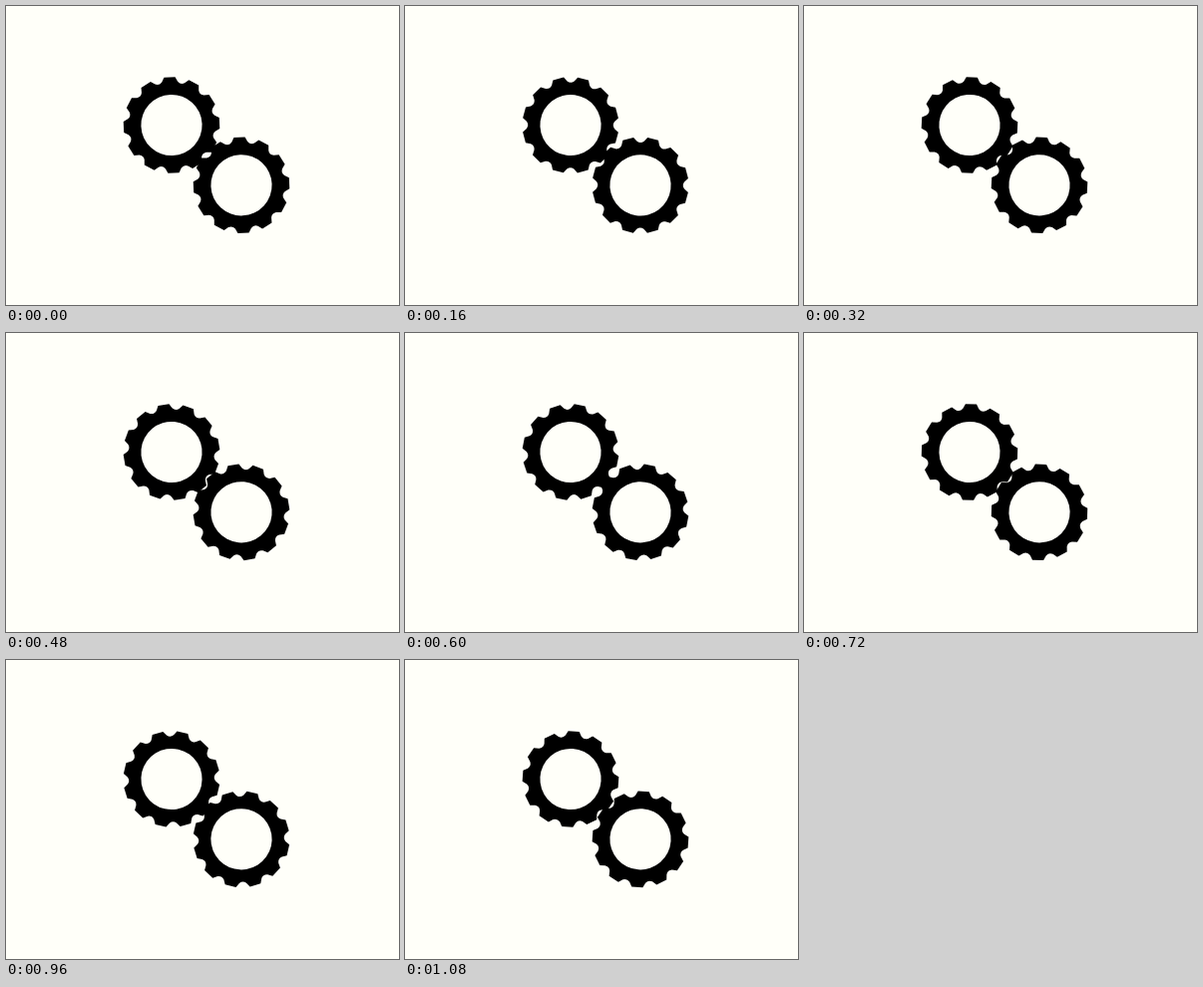
These frames come from a looping animation (394x300 px, 1.12 s). An HTML page with a canvas:

```html
<!DOCTYPE html>
<html lang="en">
<head>
<meta charset="utf-8">
<title>Gears</title>
<style>
  html, body { margin: 0; width: 100%; height: 100%; overflow: hidden; background: #fffff9; }
  canvas { display: block; }
</style>
</head>
<body>
<canvas id="stage" width="394" height="300"></canvas>
<script>
const ctx = document.getElementById('stage').getContext('2d');
const LOOP = 1120, STEP = 40, TEETH = 12, PITCH = 360 / TEETH;
const START = -2.4, TURN = -90 / 29; // degrees, and degrees per step
const CENTERS = [[166, 119.5], [236, 179.8]];

// Point at a clockwise angle in degrees from the top
function polar(r, deg) {
  const a = deg * Math.PI / 180;
  return [r * Math.sin(a), -r * Math.cos(a)];
}

function makeGear() {
  const path = new Path2D();
  for (let i = 0; i < TEETH; i++) {
    const a = i * PITCH;
    path.lineTo(...polar(48.4, a - 6.6));
    path.lineTo(...polar(48.4, a + 6.6));
    path.lineTo(...polar(44.2, a + 10.4));
    path.quadraticCurveTo(...polar(41.4, a + PITCH / 2), ...polar(44.2, a + PITCH - 10.4));
  }
  path.closePath();
  path.moveTo(30.6, 0);
  path.arc(0, 0, 30.6, 0, 2 * Math.PI);
  return path;
}

const gear = makeGear();

function draw(now) {
  const step = Math.floor(now % LOOP / STEP);
  const angle = (START + TURN * step) * Math.PI / 180;
  ctx.fillStyle = '#fffff9';
  ctx.fillRect(0, 0, 394, 300);
  ctx.fillStyle = '#000';
  for (const [x, y] of CENTERS) {
    ctx.save();
    ctx.translate(x, y);
    ctx.rotate(angle);
    ctx.fill(gear, 'evenodd');
    ctx.restore();
  }
}

const begin = performance.now();
function tick() {
  draw(performance.now() - begin);
  requestAnimationFrame(tick);
}
tick();
</script>
</body>
</html>
```
